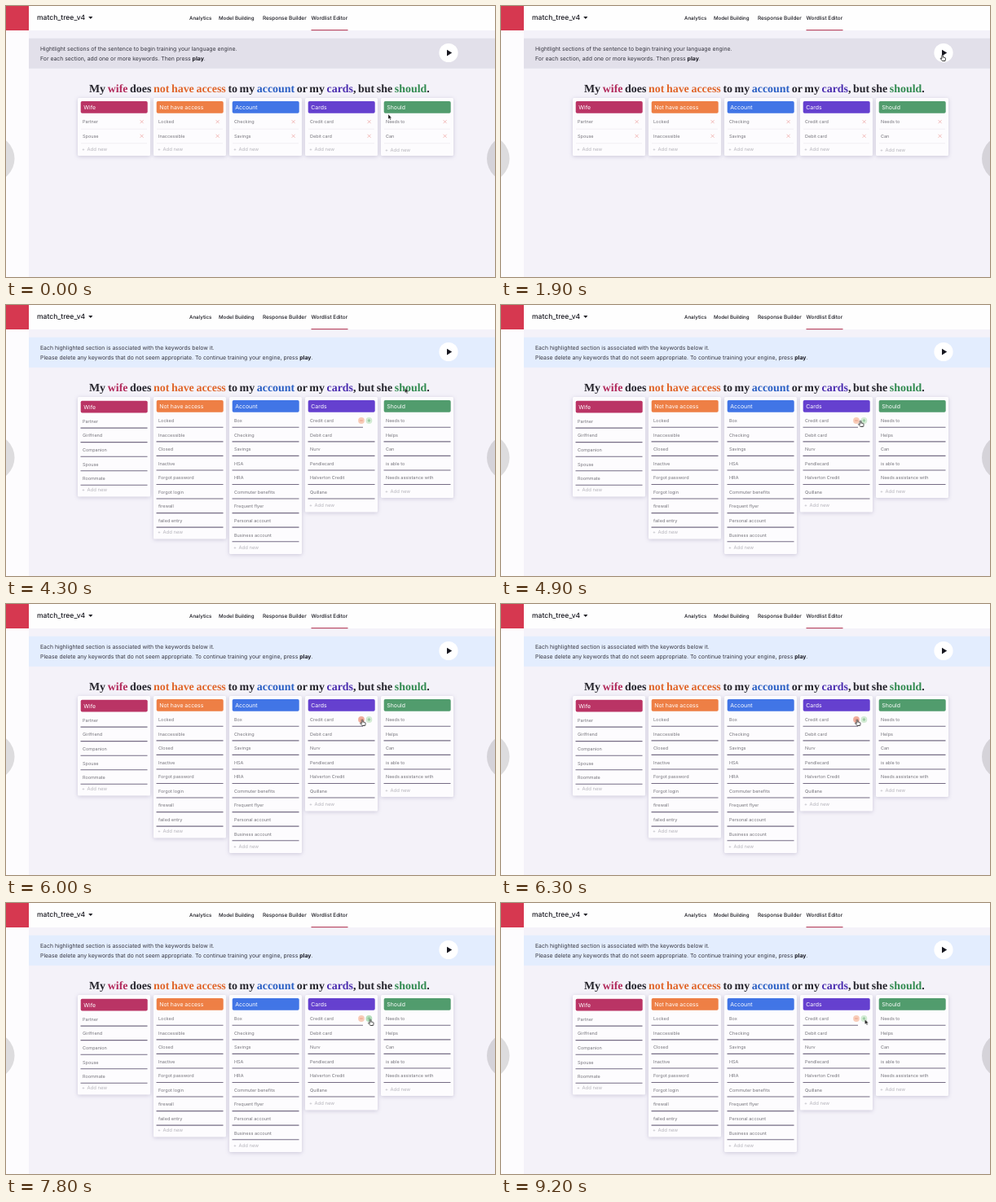
An HTML page that plays this animation: 600x333 px, repeating every 9.3 s.

```html
<!DOCTYPE html>
<html lang="en">
<head>
<meta charset="utf-8">
<title>Wordlist editor</title>
<style>
html, body { margin: 0; width: 100%; height: 100%; overflow: hidden; background: #f4f2f9; }
svg { display: block; width: 600px; height: 333px; }
text { font-family: Inter, sans-serif; text-rendering: geometricPrecision; white-space: pre; }
.nav { font-weight: 500; fill: #17171f; }
.note { font-size: 6.86px; fill: #35353f; }
.note .b { font-weight: 700; fill: #17171f; }
.title { font: bold 13.9px "Liberation Serif", serif; word-spacing: -.8px; fill: #26252d; }
.head { font-size: 6.9px; fill: #fff; }
.row { font-size: 5.5px; fill: #77767d; }
.add { font-size: 5.9px; fill: #b5b4bb; }
.card { fill: #fdfcfe; filter: drop-shadow(0 1px 2.5px rgba(60, 50, 110, .22)); }
.rule { stroke: #756c84; stroke-width: 1.1; }
.faint { stroke: #eceaf0; stroke-width: .7; }
.del { stroke: #efa9a6; stroke-width: .8; fill: none; }

.loop { animation: 9300ms step-end infinite; }
#app { animation-name: app; }
#short { animation-name: short; }
#full { opacity: 0; animation-name: full; }
#intro { animation-name: first; }
#review, #icons { opacity: 0; animation-name: second; }
#minus { animation-name: minus; }
#plus { animation-name: plus; }
#arrow { animation-name: arrow; }
#hand { opacity: 0; animation-name: hand; }
#cursor { animation: move 9300ms ease-in-out infinite; }

@keyframes app {
  0%, 46.237%, 62.903%, 74.194%, 100% { opacity: 1; }
  34.409%, 60.753%, 72.043% { opacity: 0; }
}
@keyframes short { 0% { opacity: 1; } 21.505%, 100% { opacity: 0; } }
@keyframes full { 0% { opacity: 0; } 21.505%, 100% { opacity: 1; } }
@keyframes first { 0% { opacity: 1; } 40%, 100% { opacity: 0; } }
@keyframes second { 0% { opacity: 0; } 40%, 100% { opacity: 1; } }
@keyframes minus { 0%, 74.194%, 100% { fill: #f8ccb8; } 62.903% { fill: #f0ad9c; } }
@keyframes plus { 0%, 93.548%, 100% { fill: #d3ebd4; } 74.194% { fill: #b5dfbd; } }
@keyframes arrow {
  0%, 34.409%, 60.753%, 72.043%, 93.548%, 100% { opacity: 1; }
  14%, 48.387%, 62.903%, 74.194% { opacity: 0; }
}
@keyframes hand {
  0%, 34.409%, 60.753%, 72.043%, 93.548%, 100% { opacity: 0; }
  14%, 48.387%, 62.903%, 74.194% { opacity: 1; }
}
@keyframes move {
  0%, 3% { transform: translate(469px, 133px); }
  16%, 43% { transform: translate(541px, 60px); }
  49.4%, 59% { transform: translate(440.5px, 142px); }
  65%, 69% { transform: translate(436.5px, 142px); }
  76%, 100% { transform: translate(446.5px, 143px); }
}
</style>
</head>
<body>
<svg viewBox="0 0 600 333">
  <rect width="600" height="333" fill="#f4f2f9"/>
  <g id="app" class="loop">
    <rect width="28" height="333" fill="#fdfcfe"/>
    <rect width="600" height="30" fill="#fefefe"/>
    <rect width="28" height="30" fill="#d63850"/>
    <g class="nav">
      <text x="38" y="17" font-size="8.55">match_tree_v4</text>
      <path d="M101.2 13h5.2l-2.6 3z"/>
      <text x="225" y="16.8" font-size="6.2">Analytics</text>
      <text x="261" y="16.8" font-size="6.15">Model Building</text>
      <text x="315" y="16.8" font-size="6.45">Response Builder</text>
      <text x="374.5" y="16.8" font-size="6.4">Wordlist Editor</text>
    </g>
    <rect x="374.5" y="29" width="45" height="1.2" fill="#b94a64"/>

    <g id="intro" class="loop note">
      <rect x="28" y="39.7" width="572" height="37.1" fill="#e2e0ea"/>
      <text x="42" y="54.6">Hightlight sections of the sentence to begin training your language engine.</text>
      <text x="42" y="67.1">For each section, add one or more keywords. Then press <tspan class="b">play</tspan>.</text>
    </g>
    <g id="review" class="loop note">
      <rect x="28" y="39.7" width="572" height="37.1" fill="#e3edfe"/>
      <text x="42" y="54.6">Each highlighted section is associated with the keywords below it.</text>
      <text x="42" y="67.1">Please delete any keywords that do not seem appropriate. To continue training your engine, press <tspan class="b">play</tspan>.</text>
    </g>
    <circle cx="543" cy="57.5" r="11.6" fill="#fff"/>
    <path d="M541 53.8l6.2 3.8-6.2 3.8z" fill="#17171f"/>

    <text class="title" x="102" y="105.7">My <tspan fill="#b22a5c">wife</tspan> does <tspan fill="#e0662b">not have access</tspan> to my <tspan fill="#2a5fc4">account</tspan> or my <tspan fill="#4c2fb0">cards</tspan>, but she <tspan fill="#318a50">should</tspan>.</text>

    <g id="short" class="loop"></g>
    <g id="full" class="loop"></g>
    <g id="icons" class="loop">
      <circle id="minus" class="loop" cx="436" cy="142" r="3.9" fill="#f8ccb8"/>
      <circle id="plus" class="loop" cx="445.4" cy="142" r="3.9" fill="#d3ebd4"/>
      <path d="M434.2 142h3.6" stroke="#e58f78" stroke-width=".8"/>
      <path d="M443.6 142h3.6m-1.8-1.8v3.6" stroke="#7dbb8a" stroke-width=".8"/>
    </g>
  </g>

  <g fill="#000" fill-opacity=".125">
    <circle cx="-18.5" cy="187.5" r="29"/>
    <circle cx="619" cy="187.5" r="29"/>
  </g>

  <g id="cursor">
    <path id="arrow" class="loop" d="M0 0v6l1.4-1.2 1 2.2 1-.45-1-2.1h1.8z" fill="#111" stroke="#fff" stroke-width=".35"/>
    <path id="hand" class="loop" d="M-.1.6q.7-.9 1.4 0v2.3l2.6.6q.8.3.6 1.2l-.5 2.8H.6L-1.7 4.7q-.1-.9.8-.7l.8.7z" fill="#fff" stroke="#111" stroke-width=".8" stroke-linejoin="round"/>
  </g>
</svg>
<script>
const STEP = 17.55, FIRST = 142.2;
// add: baseline centre of "Add new" in the short and the full list; drop: shift of the full list
const columns = [
  { name: "Wife", color: "#ba3465", add: [175.5, 227], drop: 0.8,
    brief: "Partner,Spouse",
    all: "Partner,Girlfriend,Companion,Spouse,Roommate" },
  { name: "Not have access", color: "#ee7f45", add: [176, 279], drop: 0,
    brief: "Locked,Inaccessible",
    all: "Locked,Inaccessible,Closed,Inactive,Forgot password,Forgot login,firewall,failed entry" },
  { name: "Account", color: "#4175e6", add: [176, 297.5], drop: 0,
    brief: "Checking,Savings",
    all: "Box,Checking,Savings,HSA,HRA,Commuter benefits,Frequent flyer,Personal account,Business account" },
  { name: "Cards", color: "#6540cf", add: [175.5, 246], drop: 0,
    brief: "Credit card,Debit card",
    all: "Credit card,Debit card,Nurv,Pendlecard,Halverton Credit,Quillane" },
  { name: "Should", color: "#519c6d", add: [177, 228.5], drop: 0,
    brief: "Needs to,Can",
    all: "Needs to,Helps,Can,is able to,Needs assistance with" }
];

const text = (cls, x, y, s) => `<text class="${cls}" x="${x}" y="${y}">${s}</text>`;
const line = (cls, x1, x2, y) => `<path class="${cls}" d="M${x1} ${y}H${x2}"/>`;

function row(word, x, y, full) {
  const label = text("row", x + 6, y + 1.9, word);
  if (full) {
    const end = word === "Credit card" ? 71 : 85.5;
    return label + line("rule", x + 3.5, x + end, y + 8.1);
  }
  return label + line("faint", x + 4, x + 85, y + 9) +
    `<path class="del" d="M${x + 76.6} ${y - 2}l4 4m0-4l-4 4"/>`;
}

function card(col, i, full) {
  const x = 88 + i * 93;
  const dy = full ? col.drop : 0;
  const add = col.add[full ? 1 : 0];
  const bottom = full ? add + 8.5 : 184;
  const words = (full ? col.all : col.brief).split(",");
  return `<rect class="card" x="${x}" y="113" width="89" height="${bottom - 113}" rx="1.5"/>` +
    `<rect x="${x + 3.7}" y="${117 + dy}" width="82" height="14.8" rx="1.8" fill="${col.color}"/>` +
    text("head", x + 7.3, 127.1 + dy, col.name) +
    words.map((w, n) => row(w, x, FIRST + dy + n * STEP, full)).join("") +
    text("add", x + 5, add + 2, "+") + text("add", x + 11.5, add + 2, "Add new");
}

const fill = (id, full) => {
  document.getElementById(id).innerHTML = columns.map((c, i) => card(c, i, full)).join("");
};
fill("short", false);
fill("full", true);
</script>
</body>
</html>
```
